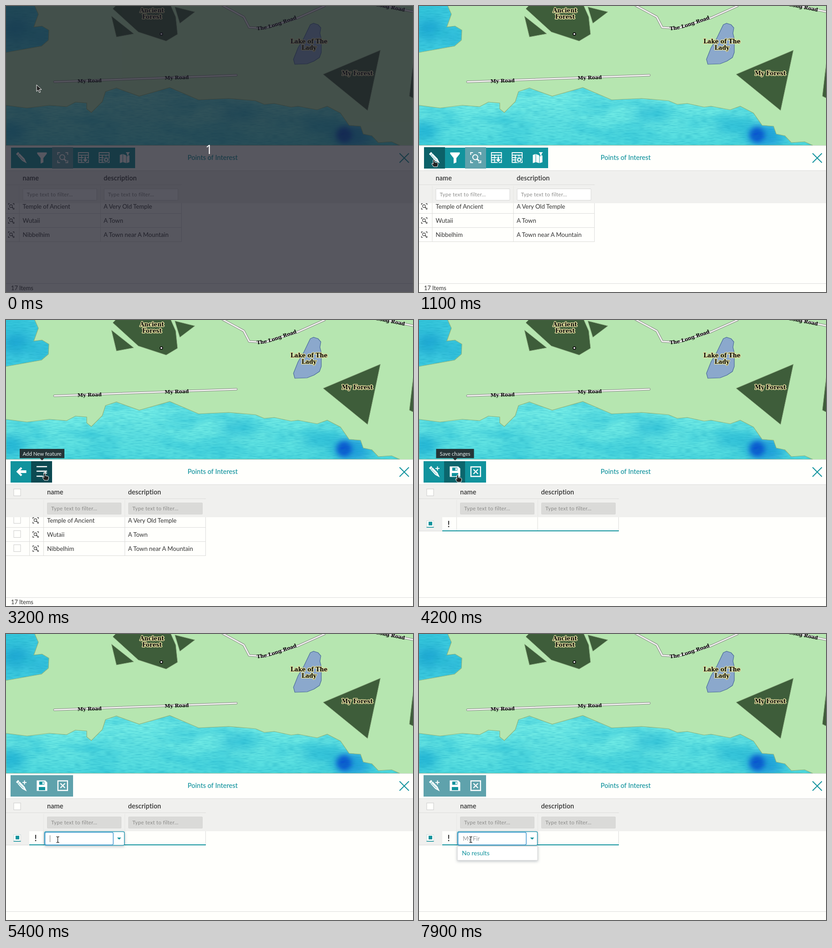
Recreate the animation shown at these times as an HTML page. Size 892 px wide and 628 px high, loop 8000 ms.

```html
<!DOCTYPE html>
<html lang="en">
<head>
<meta charset="utf-8">
<title>Feature grid editing</title>
<style>
  html, body { margin: 0; width: 892px; height: 628px; overflow: hidden; background: #fffffc; }
  svg { position: absolute; left: 0; top: 0; }
  #map { will-change: transform; }
  filter { color-interpolation-filters: sRGB; }
  text { font-family: Lato, "Open Sans", sans-serif; fill: #333; white-space: pre; }
  #map text { font: bold 10.8px "DejaVu Serif", serif; fill: #000; }
  #map .area { font-size: 12.3px; text-anchor: middle; paint-order: stroke; stroke: #e3dfa0; stroke-width: 3px; stroke-linejoin: round; }
  .head { font-size: 14.5px; font-weight: 600; letter-spacing: .1px; }
  .hint { font-size: 11.4px; letter-spacing: .3px; fill: #8b8b89; }
  .ico { fill: none; stroke: #fff; stroke-width: 2; }
  .ico .f { fill: #fff; stroke: none; }
  .line { stroke: #dcdcda; fill: none; }
</style>
</head>
<body>
<svg id="map" width="892" height="306" viewBox="0 0 892 306">
  <defs>
    <clipPath id="sea">
      <path d="M0 0H63L71 18 61 46 79 44 94 53 93 75 78 88 0 102Z"/>
      <path id="coast" d="M0 218 46 224 95 218 133 221 152 211 177 213V226L187 234 211 210 218 188 242 180 292 198 359 179 422 206 488 203 547 208 566 216 588 214 625 222 640 220 682 228 704 220 733 235 752 262 777 264 783 281 802 285 816 300 845 298 863 306H0Z"/>
    </clipPath>
    <linearGradient id="tide" x2="0" y2="1">
      <stop offset=".58" stop-color="#78efe8"/><stop offset=".8" stop-color="#6ae8e4"/><stop offset="1" stop-color="#4fdadf"/>
    </linearGradient>
    <filter id="soft" x="-60%" y="-100%" width="220%" height="300%"><feGaussianBlur stdDeviation="13"/></filter>
    <filter id="ink" x="-60%" y="-60%" width="220%" height="220%"><feGaussianBlur stdDeviation="6"/></filter>
    <filter id="wash" x="0" y="0" width="1" height="1">
      <feTurbulence type="fractalNoise" baseFrequency=".012 .03" numOctaves="3" seed="4"/>
      <feColorMatrix values="0 0 0 0 .16  0 0 0 0 .75  0 0 0 0 .84  1.3 0 0 0 -.55"/>
    </filter>
    <filter id="grain" x="0" y="0" width="1" height="1">
      <feTurbulence type="fractalNoise" baseFrequency=".06 .5" numOctaves="2" seed="9"/>
      <feColorMatrix values="0 0 0 0 .05  0 0 0 0 .6  0 0 0 0 .72  .7 0 0 0 -.28"/>
    </filter>
    <path id="bend" d="M550 53.500Q570 51.500 590 45L650 24"/>
  </defs>
  <rect width="892" height="306" fill="#b6e6b0"/>
  <g clip-path="url(#sea)">
    <rect width="892" height="306" fill="url(#tide)"/>
    <rect width="110" height="110" fill="#3fcce0"/>
    <g filter="url(#soft)" fill="#22b4d6">
      <ellipse cx="22" cy="50" rx="30" ry="24" fill="#169fd0" opacity=".8"/>
      <ellipse cx="75" cy="68" rx="16" ry="14" fill="#169fd0" opacity=".6"/>
      <ellipse cx="12" cy="275" rx="30" ry="22"/>
      <ellipse cx="505" cy="236" rx="38" ry="14" opacity=".7"/>
      <ellipse cx="290" cy="250" rx="60" ry="10" opacity=".2"/>
      <ellipse cx="690" cy="262" rx="42" ry="16" opacity=".8"/>
      <ellipse cx="760" cy="285" rx="40" ry="24" fill="#1c94dc"/>
    </g>
    <rect width="892" height="306" filter="url(#wash)"/>
    <ellipse cx="741" cy="283" rx="17" ry="17" fill="#0a55d0" filter="url(#ink)"/>
    <rect width="892" height="306" filter="url(#grain)"/>
  </g>
  <g fill="none" stroke="#8cb37c" stroke-width="1.2">
    <use href="#coast"/><path d="M63 0 71 18 61 46 79 44 94 53 93 75 78 88 0 102"/>
  </g>
  <g fill="#3e5d3a" stroke="#8fb083">
    <path d="M241 -1 234 6 290 57 351 77 376 62 372 24 361 -1Z"/>
    <path d="M231 22 280 61 242 68Z"/><path d="M370 2 414 13 381 38Z"/>
    <path d="M820.500 97 695 150 792.500 229.500Z"/><path d="M894 112 884 198 894 203Z"/>
  </g>
  <path d="M667 41 674 38 684 41 690 48 688 60 691 72 691 102 687 113 675 121 660 127 633 128 630 117 640 92 653 70 664 47Z" fill="#8ba8cc" stroke="#496b98" stroke-width="1.2"/>
  <g id="roads" fill="none" stroke-linecap="round" stroke-linejoin="round"></g>
  <circle cx="340.500" cy="61.500" r="2.800" fill="#fff" stroke="#000" stroke-width="1.600"/>
  <text transform="translate(157 169) rotate(-2)">My Road</text>
  <text transform="translate(348 162) rotate(-2)">My Road</text>
  <text><textPath href="#bend">The Long Road</textPath></text>
  <text transform="translate(810 0) rotate(11)">Long Road</text>
  <text class="area" x="320" y="14">Ancient</text><text class="area" x="320" y="28">Forest</text>
  <text class="area" x="664" y="81.500">Lake of The</text><text class="area" x="664" y="96">Lady</text>
  <text class="area" x="770" y="152">My Forest</text>
</svg>
<svg id="ui" width="892" height="628" viewBox="0 0 892 628"></svg>

<script>
const TEAL = '#11939d', PALE = '#5fa2ac', GREY = '#f0f0ee', LOOP = 8000;
const $ = id => document.getElementById(id);
const rect = (x, y, w, h, fill, more = '') => `<rect x="${x}" y="${y}" width="${w}" height="${h}" fill="${fill}" ${more}/>`;
const text = (x, y, s, size, more = '') => `<text x="${x}" y="${y}" font-size="${size}" ${more}>${s}</text>`;
const head = (x, s) => `<text class="head" x="${x}" y="382.500">${s}</text>`;
const line = (d, more = '') => `<path class="line" d="${d}" ${more}/>`;
const icon = (x, y, body) => `<g class="ico" transform="translate(${x} ${y})">${body}</g>`;
const group = (id, body) => `<g id="${id}">${body}</g>`;

const road = 'M106 166.500 505 152M475 -1 521 24 533 47 566 49 640 26 698 0M800 -7 892 12.500';
$('roads').innerHTML = `<path d="${road}" stroke="#858585" stroke-width="5"/><path d="${road}" stroke="#f3f3f0" stroke-width="3"/>`;

// Icons, each drawn around its own centre
const pencil = `<path class="f" d="M-11.500 -8 -7 -12.500 7 2 12 12.500 2 7Z"/><path d="M-9 -4 -3 -10M-6 -5 5 6" stroke="${TEAL}" stroke-width="1"/>`;
const plus = (x, y, r) => `<path d="M${x - r} ${y}H${x + r}M${x} ${y - r}V${y + r}"/>`;
const zoom = '<path d="M-11 -6V-11H-6M6 -11H11V-6M11 6V11H6M-6 11H-11V6"/><circle cx="-1" cy="-1" r="5.500"/><path d="M3 3 8 8" stroke-width="3"/>';
const table = '<path d="M-11 -11H11V10.500H-11ZM-11 -5.500H11M-11 0H11M-11 5H11M-4 -5V10M4 -5V10" stroke-width="1.800"/>';
const icons = {
  pencil,
  funnel: '<path class="f" d="M-10.500 -11.500H10.500V-8.500L3 1V10.500L-3 13V1L-10.500 -8.500Z"/>',
  zoom,
  down: table + `<path d="M1.500 -3H6.500V3H11L4 11 -3 3H1.500Z" fill="#fff" stroke="${TEAL}" stroke-width="1.500"/>`,
  gear: table + `<circle cx="4.500" cy="4.500" r="7" fill="${TEAL}" stroke="none"/><circle cx="4.500" cy="4.500" r="3.200"/><circle cx="4.500" cy="4.500" r="5" stroke-dasharray="2 1.930"/>`,
  map: '<path class="f" d="M-11 -6 -5 -8V10L-11 12ZM-4 -8 3 -5V12L-4 10ZM4 -3 10 -5V10L4 12ZM2 -12H11L8 -8V-4L5 -5V-8Z"/>',
  back: '<path class="f" d="M-11 0 -1 -10 2 -7 -2 -3H11V3H-2L2 7 -1 10Z"/>',
  row: '<path d="M-12 -11H11M-12 -1H11M-12 10H2" stroke-width="2.600"/>' + plus(7, 3, 4),
  draw: pencil + plus(7, -7, 4.500),
  save: `<path class="f" d="M-11.500 -11.500H7L11.500 -7V11.500H-11.500Z"/><path d="M-6 -9H5V-2H-6ZM-7 3H7V10H-7Z" fill="${TEAL}" stroke="none"/><path class="f" d="M1 -8H4V-3H1Z"/>`,
  cancel: '<path d="M-10.500 -10.500H10.500V10.500H-10.500ZM-5 -5 5 5M5 -5 -5 5" stroke-width="2.400"/>'
};
const tools = names => names.split(' ').map((n, i) => icon(33.5 + i * 45.4, 333, icons[n])).join('');

const rows = [['Temple of Ancient', 'A Very Old Temple', 440], ['Wutaii', 'A Town', 471], ['Nibbelhim', 'A Town near A Mountain', 502]];
const rowZoom = (x, y) => `<g transform="translate(${x} ${y}) scale(.56)" fill="none" stroke="#333" stroke-width="2">${zoom}</g>`;
const box = y => rect(17, y, 15, 15, '#fffffc', 'stroke="#ccc"');

const filters = (x, fill) => [x, x + 178].map(v =>
  rect(v + .5, 401.5, 162, 25, fill, 'stroke="#d6d6d4" rx="1"') + `<text class="hint" x="${v + 9}" y="418">Type text to filter...</text>`).join('');

const heading = (x, edge, fill) => line(`M0 392.500H${edge}`) + line(`M${x - 7.5} 395V432M${x + 170.5} 395V432`, 'opacity=".5"') +
  head(x, 'name') + head(x + 177.5, 'description') + filters(x, fill);

const list = (x, edge, boxes) => `<g clip-path="url(#body)">` + rows.map(([a, b, y]) =>
  text(x, y + 5, a, 13.2) + text(x + 177.5, y + 5, b, 13.2) + rowZoom(x - 25, y) +
  (boxes ? box(y - 8.5) : '') + line(`M0 ${y + 15.5}H${edge}`)).join('') +
  line(`M${x - 7.5} 433V517M${x + 170.5} 433V517M${edge - .5} 433V517` + (boxes ? 'M51.500 433V517' : '')) + '</g>' +
  text(11, 624, '17 Items', 12.8);

const newRow = rect(0, 433, 51, 30, GREY) + line('M0 463.500H51M82.500 433V462M260 433V462M437.500 433V462') +
  rect(51, 462, 387, 2, TEAL) + rect(17, 440.5, 15, 14, '#fffffc', 'stroke="#c9d8d8"') + rect(21, 443, 8, 8, TEAL) +
  rect(16.5, 454.5, 16, 1.5, TEAL) + text(62.5, 455, '!', 18, 'font-weight="700"');

const editor = rect(84.5, 434, 175, 30, '#fff', 'rx="3" stroke="#2c9db4" stroke-width="1.500" filter="url(#glow)"') +
  rect(85.5, 435.5, 149.5, 27.5, '#fff', 'rx="3" stroke="#4c9fd4" stroke-width="1.600"') +
  `<path d="M243.500 447H252.500L248 451.500Z" fill="${TEAL}"/>` + text(96, 454, '', 13.2, 'id="typed" style="fill:#999"') +
  `<path id="caret" d="M96.500 442V457" stroke="#777"/>`;

const menu = rect(84, 466, 176, 31, '#fff', 'stroke="#d4d4d4" filter="url(#glow)"') +
  text(94, 486, 'No results', 13.6, `id="none" style="fill:${TEAL}"`);

const pointers = {
  arrow: '<path d="M0 0V14.500L3.500 11.500 6 17 8.500 16 6 10.500H11Z" fill="#222" stroke="#fff"/>',
  hand: '<path d="M-2 0Q0 -2 1.500 0V5L7 6Q9 7 8.500 10L7 15H-1L-5 9Q-5 7 -3 7.500L-2 9Z" fill="#222" stroke="#fff"/>',
  beam: '<path d="M-3 -6Q0 -6 0 -4 0 -6 3 -6M0 -4V5M-3 7Q0 7 0 5 0 7 3 7" fill="none" stroke="#222" stroke-width="1.300"/>'
};

$('ui').innerHTML = `<defs><clipPath id="body"><rect y="433" width="892" height="170"/></clipPath>
  <filter id="glow" x="-10%" y="-40%" width="120%" height="190%"><feDropShadow dx="0" dy="2" stdDeviation="3" flood-color="#456" flood-opacity=".35"/></filter></defs>` +
  rect(0, 306, 892, 322, '#fffffc') + rect(0, 362, 892, 71, GREY) +
  line('M0 306.500H892M0 361.500H892M0 609.500H892') +
  text(398, 338, 'Points of Interest', 14.6, `font-weight="500" style="fill:${TEAL}"`) +
  `<path d="M862.500 323.500 883 344M883 323.500 862.500 344" stroke="${TEAL}" stroke-width="2"/>` +
  rect(10, 310, 137, 47, TEAL, 'id="bar"') + rect(101, 310, 46, 47, PALE, 'id="active"') + rect(10, 310, 46, 47, TEAL, 'id="hover"') +
  group('view', tools('pencil funnel zoom down gear map') + heading(36.5, 385, '#fff') + list(36.5, 385)) +
  group('edit', tools('back row') + heading(90, 438, '#dadad8') + box(371) + list(90, 438, true)) +
  group('add', tools('draw save cancel') + heading(90, 438, '#dadad8') + box(371) + newRow) +
  group('cell', rect(83.5, 434, 176, 29, 'none', `stroke="${TEAL}" stroke-width="1.500"`)) +
  group('editor', editor) + group('menu', menu) +
  group('tip', rect(0, 283, 0, 20.5, '#23282b', 'id="tipBox"') + '<path id="tipNib" fill="#23282b"/>' +
    text(0, 297.5, '', 11.4, 'id="tipText" text-anchor="middle" style="fill:#f4f4f2"')) +
  group('dim', rect(0, 0, 892, 628, 'rgba(25,25,38,.73)') + '<text x="445" y="324.500" text-anchor="middle" style="font:28px \'Open Sans\',sans-serif;fill:#fff">1</text>') +
  group('pointer', '');

// Tracks: each entry holds from its time until the next one
const mode = [[0, 'view'], [1800, 'edit'], [3400, 'add']];
const pointer = [
  [0, 67, 173, 'arrow'], [500, 70, 190, 'arrow'], [600, 75, 225, 'arrow'], [700, 78, 272, 'arrow'], [800, 77, 318, 'hand'],
  [900, 58, 334, 'hand'], [1000, 36, 339, 'hand'], [1100, 33, 338, 'hand'], [2400, 45, 340, 'hand'], [2500, 66, 339, 'hand'],
  [2600, 83, 339, 'hand'], [2800, 85, 337, 'hand'], [3500, 85, 341, 'hand'], [4300, 91, 352, 'arrow'], [4400, 99, 375, 'arrow'],
  [4500, 106, 405, 'arrow'], [4600, 111, 432, 'arrow'], [4700, 113, 447, 'arrow'], [5300, 113.5, 451, 'beam']
];
const hover = [
  [0], [800, 56, '#0c6168'], [1000, 11, '#0c6168'], [1600, 11, '#0d4a52'], [1800, 10, '#0c6168'],
  [2500, 55, '#0c6168'], [3200, 55, '#0d4a52'], [3400, 55, '#0b666d'], [4400]
];
const tip = [
  [0], [1200, 'Edit mode', 33.5, 63], [1900, 'Quit edit mode', 41, 84], [2500], [3000, 'Add New feature', 79, 98],
  [3900], [4200, 'Save changes', 79, 83], [4400]
];
const typed = [[0, ''], [6300, 'M'], [6500, 'My'], [7100, 'My F'], [7500, 'My Fi'], [7700, 'My Fir']];

const at = (track, t) => track.findLast(k => k[0] <= t);
const show = (id, on) => $(id).style.display = on ? '' : 'none';
const set = (id, attrs) => { for (const k in attrs) $(id).setAttribute(k, attrs[k]); };
let last = -1;

function draw(t) {
  const [, now] = at(mode, t);
  const view = now === 'view';
  for (const [, m] of mode) show(m, m === now);
  set('bar', {
    x: view ? 11 : 10, y: view ? 311 : 310, height: view ? 45 : 47,
    width: { view: 272, edit: 91, add: 137 }[now], fill: t < 5200 ? TEAL : PALE
  });
  show('active', view);

  const [, hx, colour] = at(hover, t);
  show('hover', colour);
  if (colour) set('hover', { x: hx, fill: colour });

  const [, label, cx, w] = at(tip, t);
  show('tip', label);
  if (label) {
    const nib = cx < 60 ? 33.5 : cx;
    set('tipBox', { x: cx - w / 2, width: w });
    set('tipNib', { d: `M${nib - 5} 303H${nib + 5}L${nib} 308.500Z` });
    set('tipText', { x: cx });
    $('tipText').textContent = label;
    set('tip', { opacity: t >= 1200 && t < 1300 ? .6 : .93 });
  }

  show('cell', t >= 4800 && t < 5100);
  show('editor', t >= 5100);
  show('caret', t >= 5300 && t < 6300);
  show('menu', t >= 6500);
  show('none', t >= 6900);
  $('typed').textContent = at(typed, t)[1];

  show('dim', t < 100);
  const [, px, py, kind] = at(pointer, t);
  set('pointer', { transform: `translate(${px} ${py})` });
  $('pointer').innerHTML = pointers[kind];
}

const start = performance.now();
function tick() {
  const t = Math.floor((performance.now() - start) % LOOP / 100) * 100;
  if (t !== last) draw(last = t);
  requestAnimationFrame(tick);
}
tick();
</script>
</body>
</html>
```
